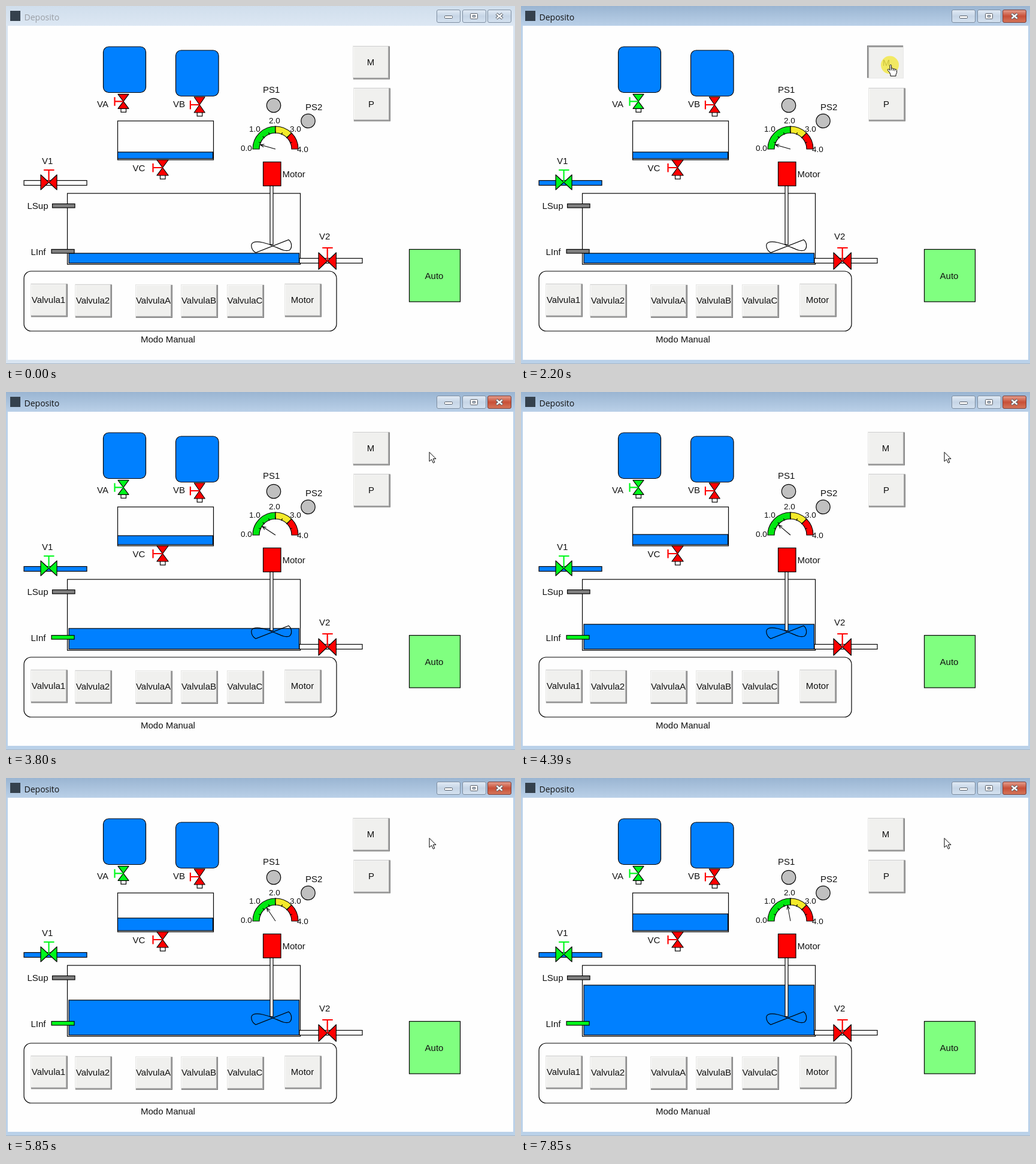
These frames come from a looping animation (850 px wide and 598 px high, 8000 ms). An HTML page:

```html
<!DOCTYPE html>
<html lang="es">
<head>
<meta charset="utf-8">
<title>Deposito</title>
<style>
  html, body { margin: 0; width: 100%; height: 100%; overflow: hidden; background: #fff; }
  svg { display: block; width: 850px; height: 598px; }
  text { font: 15px "Liberation Sans", Arial, sans-serif; fill: #111; }
  .scale { font-size: 13.5px; }
  .mid { text-anchor: middle; }
  .title { font: 14px "Open Sans", "Noto Sans", sans-serif; }
  .line { stroke: #000; stroke-width: 1.2; }
</style>
</head>
<body>
<svg id="stage" viewBox="0 0 850 598" xmlns="http://www.w3.org/2000/svg"></svg>
<script>
const LOOP = 8000;
const BLUE = '#0080ff', RED = '#ff0000', GREEN = '#00f81c', GREY = '#808080';
const GAUGE = { x: 450, y: 239, outer: 38, inner: 27 };

const box = (x, y, w, h, fill = 'none', extra = '') =>
  `<rect class="line" x="${x}" y="${y}" width="${w}" height="${h}" fill="${fill}" ${extra}/>`;
const flat = (x, y, w, h, fill, extra = '') =>
  `<rect x="${x}" y="${y}" width="${w}" height="${h}" fill="${fill}" ${extra}/>`;
const label = (x, y, s, cls = '', extra = '') =>
  `<text x="${x}" y="${y}" class="${cls}" ${extra}>${s}</text>`;

function gradient(id, ...colors) {
  const stops = colors.map((c, i) =>
    `<stop offset="${i / (colors.length - 1)}" stop-color="${c}"/>`).join('');
  return `<linearGradient id="${id}" x2="0" y2="1">${stops}</linearGradient>`;
}

// Bow-tie valve centred at the origin; a turned one has its handle on the left.
function valve(id, x, y, w, h, handle, turned) {
  const bow = turned
    ? `M${-w} ${-h}H${w}L${-w} ${h}H${w}Z`
    : `M${-w} ${-h}V${h}L${w} ${-h}V${h}Z`;
  const stem = turned
    ? `M0 0H${-handle}M${-handle} -7V7.5`
    : `M0 0V${-handle}M-8.5 ${-handle}H9`;
  const spout = turned ? box(-4, h - 1, 8.5, 7, '#fff') : '';
  return `<g id="${id}" transform="translate(${x} ${y})" fill="${RED}" stroke="${RED}">
    ${spout}<path class="line" d="${bow}" stroke-linejoin="round"/>
    <path d="${stem}" fill="none" stroke-width="2.2"/></g>`;
}

function button(x, y, name, w = 62, h = 56) {
  return flat(x, y, w, h, '#e6e6e4') + flat(x + 1, y + 1, w - 1, h - 1, '#7c7c7c') +
    flat(x + 1, y + 1, w - 2, h - 2, '#a4a4a4') + flat(x + 1, y + 1, w - 4, h - 4, '#fafafa') +
    flat(x + 2, y + 2, w - 5, h - 5, '#f0f0ee') + label(x + w / 2 - 1, y + 32, name, 'mid');
}

function pressedButton(x, y, name, w = 61, h = 55) {
  return flat(x, y, w, h, '#e8e8e8') + flat(x, y, w - 1, h - 1, '#7c7c7c') +
    flat(x + 1, y + 1, w - 2, h - 2, '#a4a4a4') + flat(x + 3, y + 3, w - 4, h - 4, '#f0f0ee') +
    label(x + 32, y + 34, name, 'mid', 'fill-opacity=".6"');
}

function polar(r, deg) {
  const a = deg * Math.PI / 180;
  return `${(GAUGE.x - r * Math.cos(a)).toFixed(2)} ${(GAUGE.y - r * Math.sin(a)).toFixed(2)}`;
}

function sector(from, to, fill) {
  const { outer: R, inner: r } = GAUGE;
  return `<path class="line" fill="${fill}" d="M${polar(R, from)}A${R} ${R} 0 0 1 ${polar(R, to)}
    L${polar(r, to)}A${r} ${r} 0 0 0 ${polar(r, from)}Z"/>`;
}

function gauge() {
  let ticks = '';
  for (let a = 22.5; a < 180; a += 22.5) ticks += `M${polar(26, a)}L${polar(30, a)}`;
  return sector(0, 90, '#00e810') + sector(90, 135, '#f4ea2a') + sector(135, 180, RED) +
    `<path class="line" d="${ticks}"/>` +
    [[392, 242], [406, 210], [439, 196], [474, 210], [486, 243.5]]
      .map(([x, y], i) => label(x, y, i + '.0', 'scale')).join('') +
    `<path id="needle" fill="none" stroke="#000" d="M450 239H423.5M430 236.5L423.5 239L430 241.5"/>`;
}

function caption(x, id, glyph) {
  return `<rect id="${id}" x="${x + .5}" y="6.5" width="39" height="21" rx="2.5"
    fill="url(#cap)" stroke="#7d8da0"/>${glyph}`;
}

const glyphs = {
  min: flat(732.5, 16.5, 13, 4, '#fff', 'stroke="#555c66" rx="1"'),
  max: flat(775.5, 12.5, 12, 9, '#fff', 'stroke="#555c66" rx="1"') +
       flat(779.5, 15.5, 4, 3, '#cbd9e8', 'stroke="#555c66"'),
  close: `<path d="M819 13L829 21M829 13L819 21" stroke="#555c66" stroke-width="4.6"/>
    <path d="M819.4 13.3L828.6 20.7M828.6 13.3L819.4 20.7" stroke="#fff" stroke-width="2.4"/>`
};

const stage = document.getElementById('stage');
stage.innerHTML = `
  <defs>
    ${gradient('idle', '#d0deec', '#dce7f3')}
    ${gradient('active', '#9ab5d2', '#bad0e8')}
    ${gradient('cap', '#e2ebf5', '#c6d5e6', '#d5e2f0')}
    ${gradient('hot', '#e5a08f', '#c84f37', '#d5775c')}
  </defs>
  <rect id="frame" width="850" height="598"/>
  <rect id="bar" width="850" height="33"/>
  ${flat(3, 33, 844, 558, '#fefefe')}
  ${flat(0, 597, 850, 1, '#a9b7c6')}
  ${flat(7, 8, 17, 17, '#35414d')}
  ${label(30.5, 23.5, 'Deposito', 'title', 'id="title"')}
  ${caption(719, 'min', glyphs.min)}${caption(762, 'max', glyphs.max)}
  ${caption(804, 'close', glyphs.close)}

  ${box(162.5, 68, 71, 76.5, BLUE, 'rx="9"')}${box(283.5, 74, 71.5, 76.5, BLUE, 'rx="9"')}
  ${box(186.5, 192, 160, 65)}${box(186.5, 244, 159, 11, BLUE, 'id="mix"')}
  ${box(102.5, 313, 389, 118.5)}${box(105, 413, 384.5, 16.5, BLUE, 'id="water"')}
  ${box(30, 291.5, 105, 8, '#fff', 'id="inlet"')}${box(490, 421.5, 105, 8, '#fff')}
  ${valve('v1', 71.5, 294.5, 13.5, 12.5, 20.5)}${valve('v2', 536.7, 426, 14.7, 14, 22)}
  ${valve('va', 196, 159.3, 9, 12, 14.5, true)}${valve('vb', 323.2, 165, 9, 13, 15.3, true)}
  ${valve('vc', 261.5, 270, 9.6, 13, 16, true)}
  ${box(77.5, 330.5, 37.5, 6.5, GREY)}${box(76, 406.5, 38, 6.5, GREY, 'id="low"')}

  ${box(429.5, 260.5, 29.5, 40, RED)}${box(441, 300.5, 5, 98, '#fff')}
  <path class="line" fill="none" d="M446 401C436 396 420 392 413 395C407 398 410 408 417 412
    L472 390.5C478 395 478 405 473 408C465 411 455 404 446 401Z"/>
  <g fill="#c0c0c0" class="line"><circle cx="447" cy="166" r="11.7"/>
    <circle cx="504.5" cy="192" r="11.7"/></g>
  ${gauge()}
  ${[[152, 169, 'VA'], [279, 168.5, 'VB'], [211.5, 276, 'VC'], [60, 263.5, 'V1'], [523, 390, 'V2'],
     [429, 145, 'PS1'], [500, 174, 'PS2'], [461.5, 286, 'Motor'], [35.5, 339, 'LSup'],
     [41.5, 416, 'LInf'], [225, 562, 'Modo Manual']].map(a => label(...a)).join('')}

  ${box(30, 443, 522, 100, 'none', 'rx="12"')}
  ${[[41, 463.5, 'Valvula1'], [115, 464.5, 'Valvula2'], [216, 465, 'ValvulaA'], [292, 465, 'ValvulaB'],
     [369, 465, 'ValvulaC'], [465, 463.5, 'Motor'], [580, 136.5, 'P']].map(a => button(...a)).join('')}
  <g id="mixUp">${button(579, 66.5, 'M')}</g>
  <g id="mixDown">${pressedButton(578, 66, 'M')}
    <circle cx="616" cy="98.5" r="15" fill="#f2e62e" fill-opacity=".72"/></g>
  ${box(673.5, 406.5, 85, 87.5, '#80ff80')}${label(715, 456, 'Auto', 'mid')}

  <path id="arrow" fill="#fff" stroke="#000" stroke-linejoin="round"
    d="M0 .5V16L3.7 12.6L6.4 18.5L8.8 17.4L6.3 11.6H11Z"/>
  <path id="hand" fill="#fff" stroke="#000" stroke-linejoin="round"
    d="M-1.5 13L-4.5 9.5C-5.5 7.5 -3.5 6.8 -2 8.3L-1 9.5V1.5C-1 -.3 1.6 -.3 1.6 1.5V6.5
    C2.5 5.5 4.3 5.8 4.5 7.2C5.5 6.3 7.2 6.8 7.4 8C8.6 7.2 10.5 8 10.5 9.6V13.5L9 16.5V19H0V16.5Z
    M1.6 6.5V9.5M4.5 7.2V10M7.4 8V10.5"/>`;

const part = {};
stage.querySelectorAll('[id]').forEach(el => part[el.id] = el);
const set = (id, name, value) => part[id].setAttribute(name, value);
const show = (id, on) => set(id, 'visibility', on ? 'visible' : 'hidden');

// Mouse moves: [start, interval, moves, from, to].
const TRIPS = [
  [320, 68.7, 8, [806, 574], [613, 88]],
  [1140, 165, 2, [614, 91], [617, 98]],
  [2470, 70, 4, [617, 98], [706.5, 100]]
];

function mouse(t) {
  const [start, gap, moves, a, b] = TRIPS.filter(trip => t >= trip[0]).pop();
  const p = Math.min(1, Math.floor((t - start) / gap + .01) / moves);
  const e = p * p * (3 - 2 * p);
  return a.map((v, i) => Math.round(v + (b[i] - v) * e));
}

// Number of simulation ticks since the valves opened.
function ticks(t) {
  if (t < 2390) return -1;
  if (t < 4650) return Math.min(10, Math.floor((t - 2390) / 200));
  if (t < 5050) return t < 4790 ? 11 : 12;
  return 13 + Math.floor((t - 5050) / 200);
}

function fillTo(id, top, bottom) {
  const y = Math.round(top);
  set(id, 'y', y);
  set(id, 'height', bottom - y);
}

function render(t) {
  const active = t >= 1740, open = t >= 2200, pressed = active && t < 2270;
  set('frame', 'fill', active ? '#bad1e9' : '#d8e4f1');
  set('bar', 'fill', active ? 'url(#active)' : 'url(#idle)');
  set('close', 'fill', active ? 'url(#hot)' : 'url(#cap)');
  set('close', 'stroke', active ? '#7a3a34' : '#7d8da0');
  part.title.style.fill = active ? '#111' : '#9a9ea4';
  show('mixUp', !pressed);
  show('mixDown', pressed);

  for (const id of ['v1', 'va']) {
    set(id, 'fill', open ? GREEN : RED);
    set(id, 'stroke', open ? GREEN : RED);
  }
  set('inlet', 'fill', open ? BLUE : '#fff');

  const n = ticks(t);
  const level = n < 0 ? 413 : 412.15 - 2.45 * n;
  fillTo('water', level, 429.5);
  fillTo('mix', n < 0 ? 244 : 244.4 - .64 * n, 255);
  set('low', 'fill', level < 410 ? GREEN : GREY);
  set('needle', 'transform', `rotate(${16 + (413 - level) * .95} ${GAUGE.x} ${GAUGE.y})`);

  const visible = t >= 320;
  const [x, y] = visible ? mouse(t) : [0, 0];
  const over = x > 579 && x < 641 && y > 66 && y < 123;
  show('hand', visible && over);
  show('arrow', visible && !over);
  set(over ? 'hand' : 'arrow', 'transform', `translate(${x} ${y})`);
}

const began = performance.now();
function frame() {
  render((performance.now() - began) % LOOP);
  requestAnimationFrame(frame);
}
frame();
</script>
</body>
</html>
```
